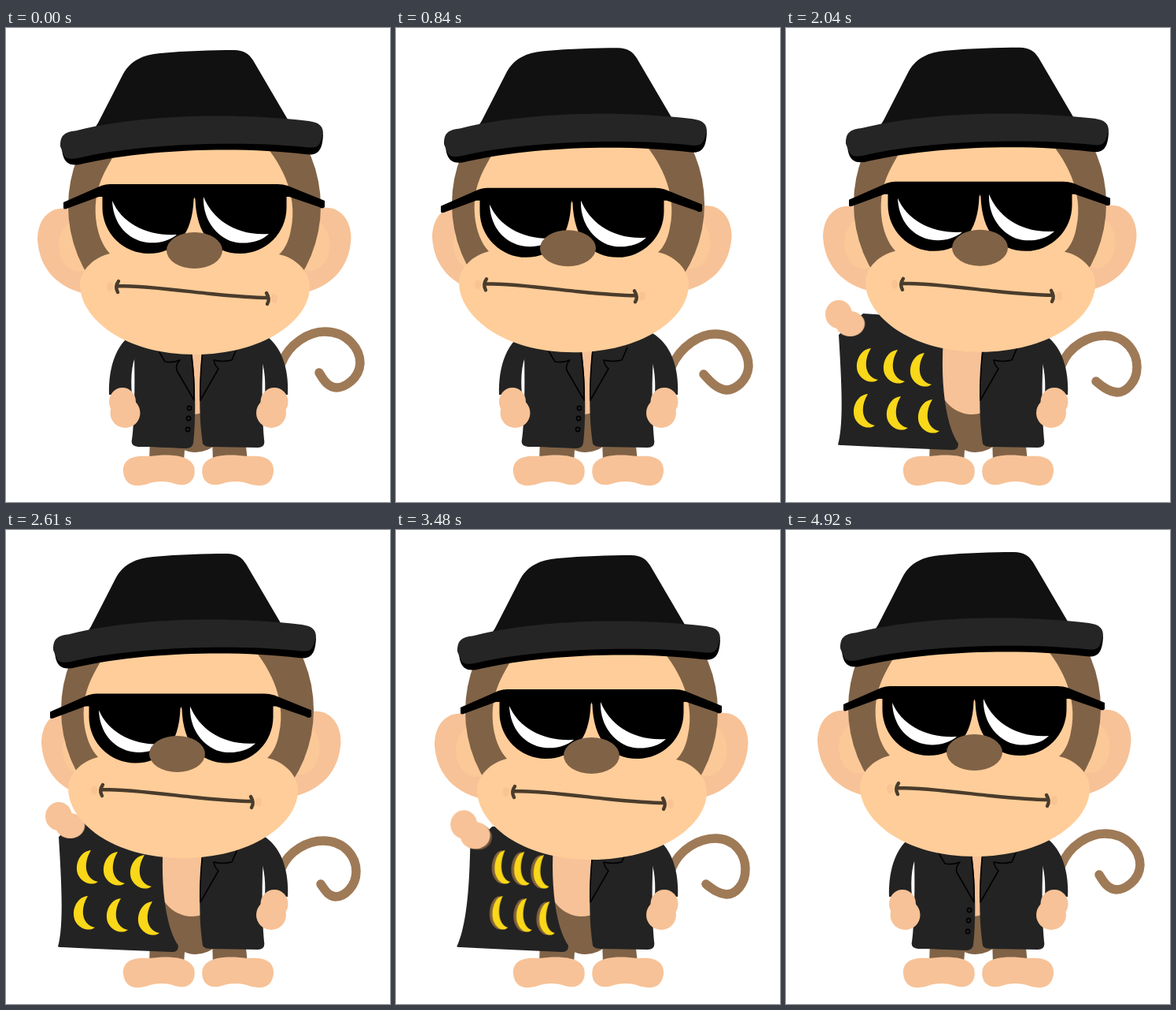
These frames come from a looping animation (488 px wide and 601 px high, 4950 ms). An HTML page without scripts:

```html
<!DOCTYPE html>
<html lang="en">
<head>
<meta charset="utf-8">
<title>Monkey in a coat</title>
<style>
  @property --t { syntax: "<number>"; inherits: true; initial-value: 0; }
  @property --x { syntax: "<number>"; inherits: true; initial-value: 0; }
  @property --y { syntax: "<number>"; inherits: true; initial-value: 0; }
  @property --m { syntax: "<number>"; inherits: true; initial-value: 0; }

  html, body { margin: 0; width: 100%; height: 100%; overflow: hidden; background: #fff; }
  svg { display: block; width: 100%; height: 100%; }

  .coat { fill: #232323; }
  .fur { fill: #806246; }
  .skin { fill: #ffcd99; }
  .paw { fill: #f7c297; }
  .seam { fill: none; stroke: #000; stroke-width: 1.6; stroke-linejoin: round; }
  .lips { fill: none; stroke: #4a3c2c; stroke-width: 4.4; stroke-linecap: round; }
  .tail { fill: none; stroke: #9f7a57; stroke-width: 11.5; stroke-linecap: round; }

  .tail, .flap, .sleeve, .hand, .palm, .bananas, .show, .blur, .closed {
    animation: 4950ms linear infinite;
  }

  /* head: --t turns it, --x and --y move it, --m slides the mouth */
  .head {
    animation: turn 4950ms ease-in-out infinite, bob 4950ms linear infinite;
    transform: translate(calc(var(--x) * 1px), calc(var(--y) * 1px));
  }
  .ear-l { transform: translateX(calc(var(--t) * 14px)); }
  .ear-r { transform: translateX(calc(var(--t) * -4px)); }
  .face { transform: translateX(calc(var(--t) * -6px)); }
  .shades { transform: translate(calc(var(--t) * -8px), calc(var(--t) * 7.5px)); }
  .nose { transform: translateX(calc(var(--t) * -13px)); }
  .mouth { transform: translateX(calc(var(--m) * 1px)); }

  @keyframes turn {
    0%, 4% { --t: 0; --x: 0; --m: 0; }
    11.3% { --t: 1; --x: -8; --m: -16; }
    17%, 22% { --t: 1; --x: -8; --m: -20; }
    30%, 44% { --t: 0; --x: 7; --m: -1; }
    51.5%, 60% { --t: 1; --x: -9; --m: -11; }
    65.5% { --t: 0; --x: 8; --m: -1; }
    70.3% { --t: 0; --x: 9; --m: -1; }
    80.6% { --t: 0; --x: 7; --m: -1; }
    93%, 100% { --t: 0; --x: 0; --m: 0; }
  }
  @keyframes bob {
    0% { --y: 0; }
    11% { --y: -1.2; }
    17% { --y: -2.7; }
    24% { --y: -3.6; }
    33% { --y: -4; }
    41.2% { --y: -3.2; }
    44.5% { --y: -2; }
    52.7% { --y: 2; }
    60% { --y: 3.6; }
    70.3% { --y: 4; }
    76% { --y: 2.8; }
    80.6% { --y: 1; }
    88%, 100% { --y: 0; }
  }

  .tail { animation-name: wag; animation-timing-function: ease-in-out; }
  @keyframes wag {
    0%, 100% { d: path("M350 425C360 400 385 385 405 385C435 385 450 408 450 425C449 445 430 456 420 456C408 455 403 445 398 437"); }
    17% { d: path("M350 430C362 402 388 388 405 388C435 388 448 412 448 429C447 447 431 459 420 459C408 458 399 448 391 439"); }
    41.2% { d: path("M350 428C360 402 386 390 405 390C433 390 446 412 446 430C446 450 431 462 421 462C410 461 402 455 394 448"); }
    52.7% { d: path("M350 429C360 406 384 394 403 394C431 394 445 415 445 433C445 452 430 465 419 465C409 464 405 456 400 449"); }
    70.3% { d: path("M350 430C360 404 386 391 406 391C431 391 444 412 444 430C444 450 431 462 420 462C409 461 402 455 394 449"); }
    80.6% { d: path("M350 428C360 402 386 390 405 390C430 390 442 412 442 430C442 450 430 461 420 461C409 460 404 453 398 446"); }
  }

  .flap { animation-name: flap; }
  @keyframes flap {
    0%, 21.2%, 77%, 100% { d: path("M163 388L185 385L235 400C242 450 241 500 238 526Q237 533 229 533C205 532 185 531 168 531Q158 530 160 522C163 500 164 460 163 415Z"); }
    31%, 70.3% { d: path("M122 376L135 376L200 395C196 450 203 505 219 527Q219 536 210 535C165 533 120 531 82 529Q77 529 77 528C90 500 93 450 94 403Z"); }
    35%, 66.7% { d: path("M98 362L128 364L200 395C196 450 203 505 219 527Q219 536 210 535C160 533 110 531 72 529Q66 529 66 528C74 500 70 440 67 389Z"); }
  }

  .sleeve { animation-name: sleeve; }
  @keyframes sleeve {
    0%, 21.2%, 77%, 100% { d: path("M170 383C140 395 130 430 131 465L160 465C158 440 160 420 170 405Z"); }
    31%, 70.3% { d: path("M170 388C150 384 135 380 125 378L112 395C130 405 150 410 170 410Z"); }
    35%, 66.7% { d: path("M170 388C140 380 115 370 100 368L92 385C120 395 150 405 170 405Z"); }
  }

  .hand { animation-name: hand; }
  @keyframes hand {
    0%, 21.2%, 77%, 100% { transform: none; }
    31%, 70.3% { transform: translate(-62px, -101px); }
    35%, 66.7% { transform: translate(-81px, -111px); }
  }
  .palm { animation-name: palm; transform-box: fill-box; transform-origin: center; }
  @keyframes palm {
    0%, 21.2%, 77%, 100% { transform: none; }
    31%, 70.3% { transform: translate(11px, 0) scale(1, .9); }
    35%, 66.7% { transform: translate(11px, -2px) scale(.98, .84); }
  }

  .bananas { animation-name: fold; transform-origin: 220px 0; }
  @keyframes fold {
    0%, 23%, 77%, 100% { transform: scaleX(.15); }
    31%, 70.3% { transform: scaleX(.73); }
    35%, 66.7% { transform: none; }
  }
  .show { animation-name: show; animation-timing-function: step-end; }
  @keyframes show {
    0%, 25%, 75%, 100% { opacity: 0; }
    25.1% { opacity: 1; }
  }
  .blur { animation-name: blur; }
  @keyframes blur {
    0%, 23%, 35%, 66.7%, 77%, 100% { opacity: 0; }
    27%, 31%, 69%, 73% { opacity: 1; }
  }
  .closed { animation-name: closed; animation-timing-function: step-end; }
  @keyframes closed {
    0%, 76.5%, 100% { opacity: 1; }
    21.6% { opacity: 0; }
  }
</style>
</head>
<body>
<svg viewBox="0 0 488 601" preserveAspectRatio="none">
  <defs>
    <path id="banana" d="M108 406C94 407 86 425 92 438C98 449 111 451 117 446C101 443 97 424 108 406Z"/>
    <g id="bunch">
      <use href="#banana"/>
      <use href="#banana" x="34" y="2"/>
      <use href="#banana" x="68" y="6"/>
      <use href="#banana" x="-4" y="58"/>
      <use href="#banana" x="38" y="61"/>
      <use href="#banana" x="78" y="65"/>
    </g>
    <path id="foot" d="M149 563C148 547 160 541 182 543C205 540 233 540 239 556C243 574 230 583 215 578C205 574 190 574 180 578C164 583 151 580 149 563Z"/>
    <g id="ear">
      <path fill="#f7c297" d="M95 236C65 218 40 236 40 268C42 305 65 330 105 338Z"/>
      <ellipse cx="92" cy="276" rx="25" ry="33" fill="#fbc998"/>
    </g>
    <path id="lens" d="M122.500 200V228A58.500 58.500 0 0 0 181 286C216 286 237 262 238.500 217L239.500 215V200Z"/>
  </defs>

  <path class="tail" d="M350 425C360 400 385 385 405 385C435 385 450 408 450 425C449 445 430 456 420 456C408 455 403 445 398 437"/>

  <g class="fur">
    <path d="M183 520H228L226 550H182ZM262 520H304L307 550H263Z"/>
    <ellipse cx="241" cy="468" rx="50" ry="70"/>
  </g>
  <ellipse class="paw" cx="236" cy="435" rx="46" ry="55"/>
  <g class="paw">
    <use href="#foot"/>
    <use href="#foot" transform="matrix(-1 0 0 1 489 0)"/>
  </g>

  <g class="coat">
    <path d="M318 383C350 396 360 432 358 465H329C330 445 329 425 318 405Z"/>
    <path d="M250 400C245 450 245 495 250 527Q252 531 260 531L320 532Q330 532 328 522C325 490 325 450 327 415L322 388Z"/>
    <path class="sleeve" d="M170 383C140 395 130 430 131 465L160 465C158 440 160 420 170 405Z"/>
    <path class="flap" d="M163 388L185 385L235 400C242 450 241 500 238 526Q237 533 229 533C205 532 185 531 168 531Q158 530 160 522C163 500 164 460 163 415Z"/>
  </g>
  <path class="seam" d="M294 405L287 421Q275 424 264 421Q265 428 270 432L247 472Q246 445 250 408"/>

  <g class="closed seam">
    <path d="M193 408L202 423Q212 425 221 421Q215 427 217 434L239 472Q240 445 235 410"/>
    <circle cx="233" cy="482" r="2.6"/>
    <circle cx="232" cy="495" r="2.6"/>
    <circle cx="231" cy="509" r="2.6"/>
  </g>

  <g class="show">
    <g class="bananas">
      <use class="blur" href="#bunch" x="-5" fill="#80613e"/>
      <use href="#bunch" fill="#f9d719"/>
    </g>
  </g>

  <g class="paw">
    <ellipse cx="341" cy="474" rx="17.5" ry="18"/>
    <ellipse cx="337" cy="488" rx="19" ry="19"/>
  </g>
  <g class="hand">
    <g class="blur"><ellipse class="palm" cx="155" cy="490" rx="18" ry="18" fill="#6b523b"/></g>
    <g class="paw">
      <ellipse cx="148" cy="474" rx="17" ry="18"/>
      <ellipse class="palm" cx="151.500" cy="488" rx="19" ry="19"/>
    </g>
  </g>

  <g class="head">
    <g class="ear-l"><use href="#ear"/></g>
    <g class="ear-r"><use href="#ear" transform="matrix(-1 0 0 1 478.500 -1)"/></g>
    <ellipse class="fur" cx="239.500" cy="226" rx="160.500" ry="163"/>
    <path class="face skin" d="M132 286C112 265 109 222 120 195C126 180 133 168 150 140H322C348 168 372 210 362 256C360 268 355 280 347 287C367 291 386 308 386 328C386 372 325 414 240 414C150 414 94 368 94 325C94 308 112 290 132 286Z"/>

    <g class="mouth">
      <g fill="#f9c394">
        <ellipse cx="132" cy="328" rx="4" ry="6"/>
        <ellipse cx="341" cy="343" rx="4" ry="6"/>
      </g>
      <path class="lips" d="M142 327C180 327 230 334 260 337S310 342 333 342M143 321Q138 328 142 335M331 336Q336 344 332 350"/>
    </g>

    <g class="shades">
      <use href="#lens"/>
      <use href="#lens" transform="matrix(-1 0 0 1 479 0)"/>
      <path d="M73 221L121 200Q127 198 132 198H345Q352 198 358 200L405 219V227Q402 230 398 227L360 214H118L80 228Q73 231 73 228Z"/>
      <g fill="#fff">
        <path d="M135 219C147 247 178 264 217 262C205 272 186 275 170 270C148 262 136 243 135 219Z"/>
        <path d="M251 214C262 242 292 264 334 261C322 273 300 275 285 270C262 260 250 238 251 214Z"/>
      </g>
    </g>
    <ellipse class="nose fur" cx="239.500" cy="282" rx="35.500" ry="23"/>

    <path d="M70 148L72 160C75 172 82 176 98 172C180 153 300 150 380 160C395 162 402 158 403 135Z"/>
    <path fill="#111" d="M111 132L149 58C159 41 174 34 196 32C230 29 260 28 290 28C302 28 309 33 314 41L361 121C290 112 190 112 111 132Z"/>
    <path fill="#252525" d="M69 150C69 135 75 132 90 130C180 108 300 108 385 118C399 120 403 125 403 134L400 143C397 153 390 152 380 151C300 143 180 146 100 163C80 168 76 166 73 160Z"/>
  </g>
</svg>
</body>
</html>
```
